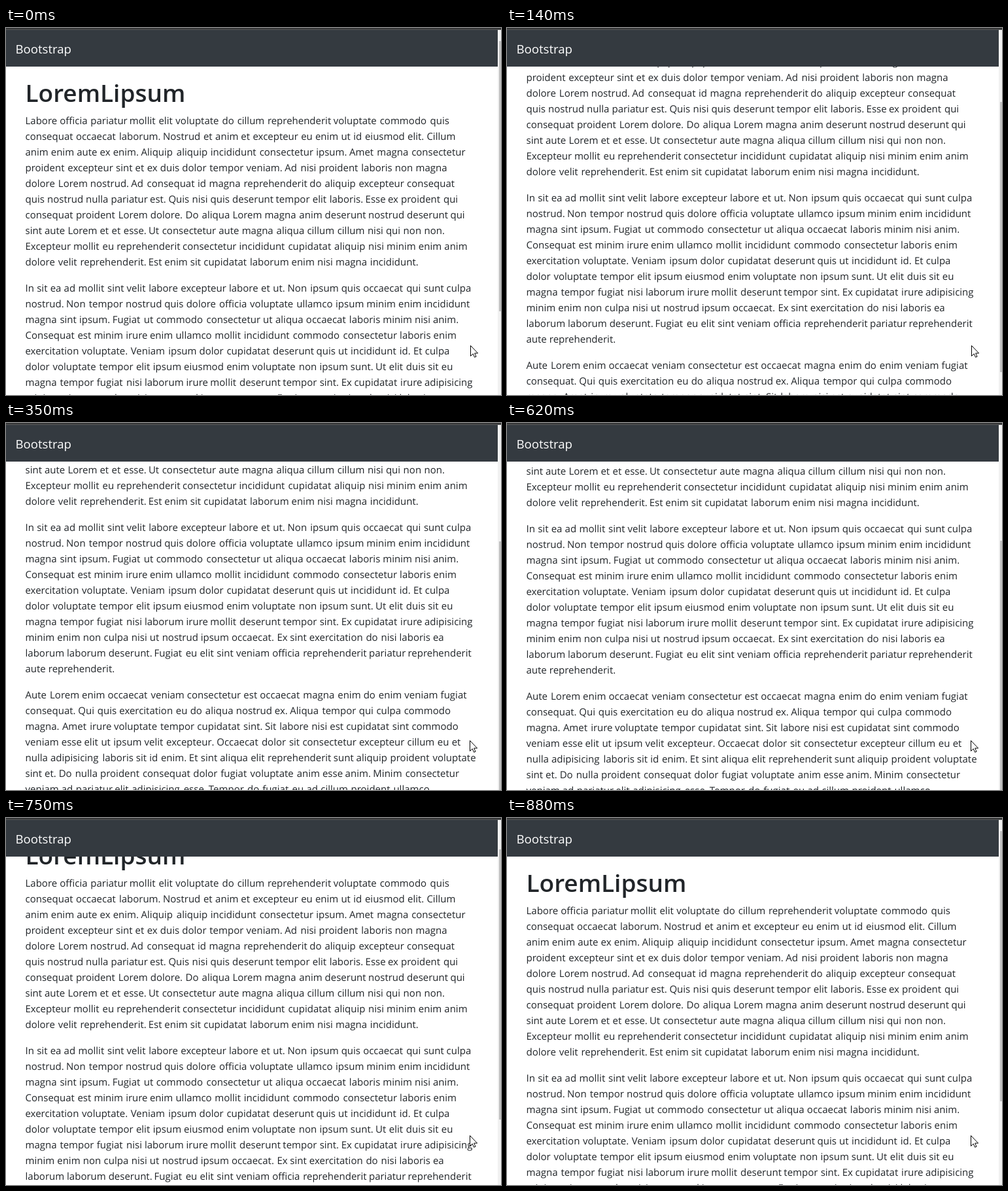
Animation, 757 px wide and 561 px high, one loop 1080 ms. Source, as an HTML page:

```html
<!DOCTYPE html>
<html lang="en">
<head>
<meta charset="utf-8">
<title>Scrolling page</title>
<style>
  html, body { margin: 0; width: 100%; height: 100%; overflow: hidden; background: #fff; }
  svg { display: block; width: 757px; height: 561px; }
  text { font-family: "Open Sans", "Noto Sans", sans-serif; fill: #212529; white-space: pre; }
  .body { font-size: 15px; text-rendering: geometricPrecision; }
  .title { font-size: 37px; font-weight: 600; }
  .brand { font-size: 18.6px; fill: #fff; }
</style>
</head>
<body>
<svg viewBox="0 0 757 561">
  <rect width="757" height="561" fill="#fff"/>
  <g id="page">
    <text class="title" x="29.5" y="113">LoremLipsum</text>
  </g>
  <rect y="3" width="752" height="56" fill="#343a40"/>
  <text class="brand" x="14.5" y="39">Bootstrap</text>
  <rect x="752" y="3" width="5" height="558" fill="#f1f1f1"/>
  <rect id="thumb" x="754" y="20" width="3" height="413" fill="#c1c1c1"/>
  <rect width="757" height="3" fill="#343536"/>
  <rect y="2" width="757" height="1" fill="#58595a"/>
  <path id="cursor" d="M.5 .5V16.5L4.2 13L6.6 18.3L9 17.3L6.7 12.1H11.6Z" fill="#fff" stroke="#000"/>
</svg>
<script>
const paragraphs = [
`Labore officia pariatur mollit elit voluptate do cillum reprehenderit voluptate commodo quis
consequat occaecat laborum. Nostrud et anim et excepteur eu enim ut id eiusmod elit. Cillum
anim enim aute ex enim. Aliquip aliquip incididunt consectetur ipsum. Amet magna consectetur
proident excepteur sint et ex duis dolor tempor veniam. Ad nisi proident laboris non magna
dolore Lorem nostrud. Ad consequat id magna reprehenderit do aliquip excepteur consequat
quis nostrud nulla pariatur est. Quis nisi quis deserunt tempor elit laboris. Esse ex proident qui
consequat proident Lorem dolore. Do aliqua Lorem magna anim deserunt nostrud deserunt qui
sint aute Lorem et et esse. Ut consectetur aute magna aliqua cillum cillum nisi qui non non.
Excepteur mollit eu reprehenderit consectetur incididunt cupidatat aliquip nisi minim enim anim
dolore velit reprehenderit. Est enim sit cupidatat laborum enim nisi magna incididunt.`,
`In sit ea ad mollit sint velit labore excepteur labore et ut. Non ipsum quis occaecat qui sunt culpa
nostrud. Non tempor nostrud quis dolore officia voluptate ullamco ipsum minim enim incididunt
magna sint ipsum. Fugiat ut commodo consectetur ut aliqua occaecat laboris minim nisi anim.
Consequat est minim irure enim ullamco mollit incididunt commodo consectetur laboris enim
exercitation voluptate. Veniam ipsum dolor cupidatat deserunt quis ut incididunt id. Et culpa
dolor voluptate tempor elit ipsum eiusmod enim voluptate non ipsum sunt. Ut elit duis sit eu
magna tempor fugiat nisi laborum irure mollit deserunt tempor sint. Ex cupidatat irure adipisicing
minim enim non culpa nisi ut nostrud ipsum occaecat. Ex sint exercitation do nisi laboris ea
laborum laborum deserunt. Fugiat eu elit sint veniam officia reprehenderit pariatur reprehenderit
aute reprehenderit.`,
`Aute Lorem enim occaecat veniam consectetur est occaecat magna enim do enim veniam fugiat
consequat. Qui quis exercitation eu do aliqua nostrud ex. Aliqua tempor qui culpa commodo
magna. Amet irure voluptate tempor cupidatat sint. Sit labore nisi est cupidatat sint commodo
veniam esse elit ut ipsum velit excepteur. Occaecat dolor sit consectetur excepteur cillum eu et
nulla adipisicing laboris sit id enim. Et sint aliqua elit reprehenderit sunt aliquip proident voluptate
sint et. Do nulla proident consequat dolor fugiat voluptate anim esse anim. Minim consectetur
veniam ad pariatur elit adipisicing esse. Tempor do fugiat eu ad cillum proident ullamco`
];

// Letter pitch in 1/2048 em, used to place the start of each word.
const pitch = {
  a: 1042, b: 1204, c: 946, d: 1206, e: 1071, f: 641, g: 1206, h: 1159, i: 496,
  l: 496, m: 1764, n: 1159, o: 1200, p: 1204, q: 1206, r: 711, s: 869, t: 694,
  u: 1159, v: 981, x: 940, ' ': 561, '.': 444,
  A: 1321, C: 1268, D: 1436, E: 1036, F: 999, I: 545, L: 964, M: 1839,
  N: 1532, O: 1544, Q: 1545, S: 1087, T: 1073, U: 1407, V: 1271
};
const LEFT = 29.5, LINE = 24, PARA_GAP = 16, EM = 16;
const LOOP = 1080, THUMB_RATIO = 0.676;

// [start ms, scroll offset]; each offset holds until the next.
const scrollSteps = [
  [0, 0], [70, 31], [140, 138], [210, 219], [280, 236], [350, 238],
  [620, 236], [690, 133], [750, 42], [820, 8], [880, 0]
];

const byId = id => document.getElementById(id);
const page = byId('page'), thumb = byId('thumb'), cursor = byId('cursor');

function add(parent, tag, attrs, content = '') {
  const node = document.createElementNS('http://www.w3.org/2000/svg', tag);
  for (const key in attrs) node.setAttribute(key, attrs[key]);
  node.textContent = content;
  return parent.appendChild(node);
}

const widthOf = s => [...s].reduce((sum, ch) => sum + pitch[ch], 0) * EM / 2048;

function addLine(line, y) {
  const text = add(page, 'text', { class: 'body', y });
  let x = LEFT;
  for (const word of line.split(' ')) {
    add(text, 'tspan', { x: x.toFixed(2) }, word + ' ');
    x += widthOf(word + ' ');
  }
}

let y = 147;
for (const paragraph of paragraphs) {
  for (const line of paragraph.split('\n')) {
    addLine(line, y);
    y += LINE;
  }
  y += PARA_GAP;
}

function draw(t) {
  const [, scroll] = scrollSteps.findLast(([start]) => t >= start);
  page.setAttribute('transform', `translate(0 ${-scroll})`);
  thumb.setAttribute('y', 20 + Math.round(scroll * THUMB_RATIO));
  cursor.setAttribute('transform', `translate(${t < 350 ? 710 : 709} 485)`);
}

const began = performance.now();
function tick() {
  draw((performance.now() - began) % LOOP);
  requestAnimationFrame(tick);
}
tick();
</script>
</body>
</html>
```
